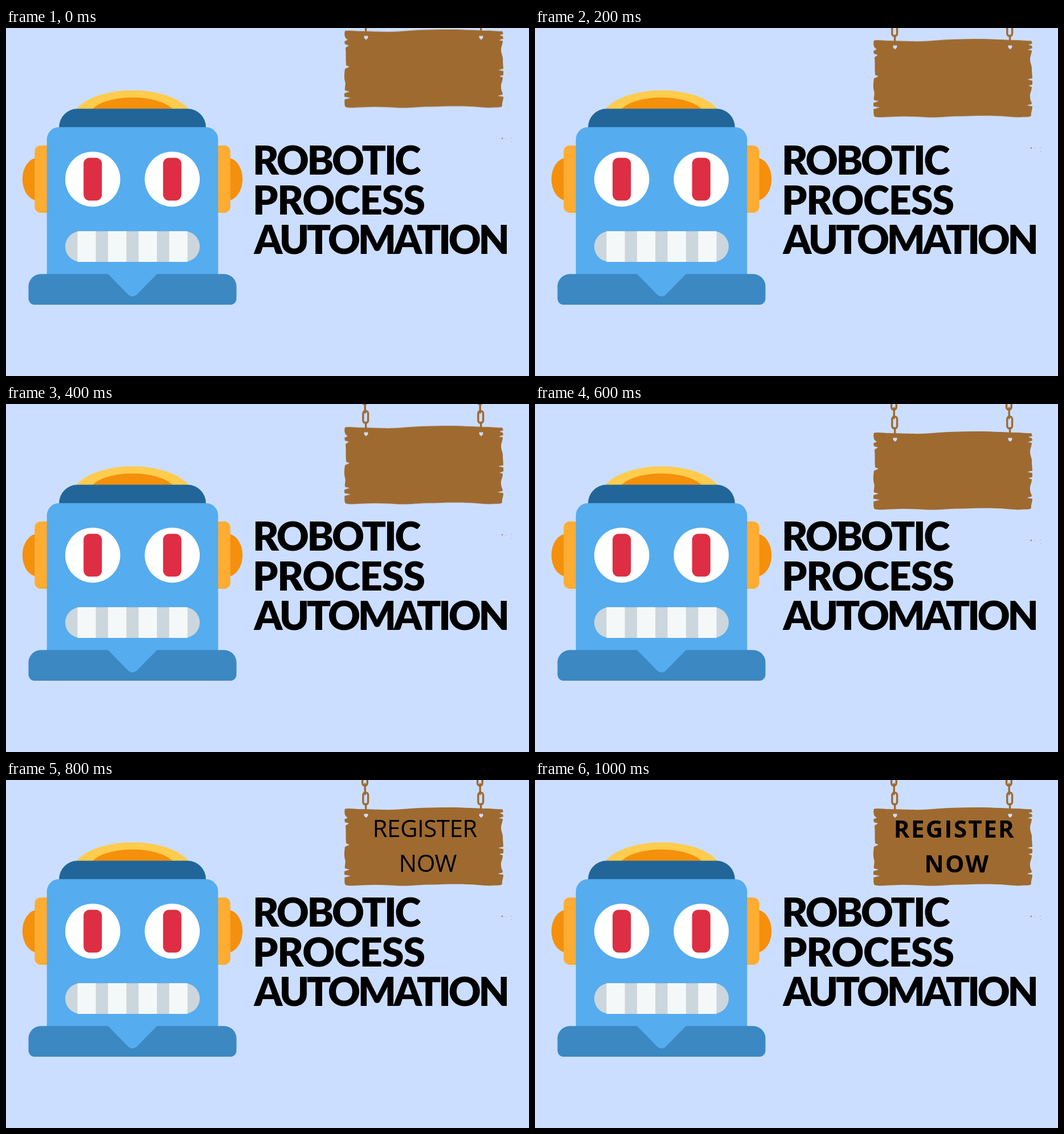
An HTML page for the animation above (1200 ms loop, 918 px wide and 610 px high).

```html
<!DOCTYPE html>
<html lang="en">
<head>
<meta charset="utf-8">
<title>Robotic Process Automation</title>
<style>
  html, body { margin: 0; width: 100%; height: 100%; overflow: hidden; background: #ccdeff; }
  svg { display: block; width: 100%; height: 100%; }
  .title { font: 900 70px Lato, sans-serif; }
  .call { font: 400 42px "Open Sans", sans-serif; text-anchor: middle; letter-spacing: -.5px; }
  .bold { font-weight: 700; letter-spacing: 2.4px; }
  .sign, .call { animation: 1.2s step-end infinite; }
  .sign { animation-name: drop; }
  .thin { animation-name: thin; }
  .bold { animation-name: bold; }
  @keyframes drop {
    0% { transform: translateY(-45.5px); }
    16.66% { transform: translateY(-28.8px); }
    33.33% { transform: translateY(-9.8px); }
    50%, 100% { transform: none; }
  }
  @keyframes thin {
    0% { opacity: 0; }
    66.66% { opacity: 1; }
    83.33%, 100% { opacity: 0; }
  }
  @keyframes bold {
    0% { opacity: 0; }
    83.33%, 100% { opacity: 1; }
  }
</style>
</head>
<body>
<svg viewBox="0 0 918 610" preserveAspectRatio="none">
  <defs>
    <g id="chain" fill="none" stroke="#9e6a30" stroke-width="3.4" stroke-linecap="round">
      <rect x="-5.4" y="-12" width="8.6" height="22" rx="4.3"/>
      <path d="M-.8 7V25M.6 42V52"/>
      <rect x="-4.2" y="22" width="8.8" height="21" rx="4.4"/>
    </g>
    <path id="hole" fill="#ccdeff" d="M0 66C-2 64.5-3.6 63-3.6 61.2C-3.6 58.6-.8 58.4 0 60.2C.8 58.4 3.6 58.6 3.6 61.2C3.6 63 2 64.5 0 66Z"/>
  </defs>

  <!-- robot on a 36-unit grid -->
  <g transform="translate(28.8 109.3) scale(10.735)">
    <g fill="#f4900c">
      <ellipse cx="2.5" cy="14.5" rx="2.5" ry="3.5"/>
      <ellipse cx="33.5" cy="14.5" rx="2.5" ry="3.5"/>
    </g>
    <g fill="#ffac33">
      <rect x="2" y="9" width="5" height="11" rx="1"/>
      <rect x="29" y="9" width="5" height="11" rx="1"/>
    </g>
    <ellipse cx="18" cy="5" rx="10" ry="5" fill="#ffcc4d"/>
    <ellipse cx="18" cy="4.1" rx="7" ry="2.93" fill="#f4900c"/>
    <path fill="#226699" d="M6 7V6A3 3 0 0 1 9 3H27A3 3 0 0 1 30 6V7Z"/>
    <path fill="#55acee" d="M4 31V8A2 2 0 0 1 6 6H30A2 2 0 0 1 32 8V31Z"/>
    <path fill="#3b88c3" d="M1 34V32A2 2 0 0 1 3 30H33A2 2 0 0 1 35 32V34A1 1 0 0 1 34 35H2A1 1 0 0 1 1 34Z"/>
    <path fill="#55acee" d="M13.9 29.9H22.1L18.707 33.35A1 1 0 0 1 17.293 33.35Z"/>
    <g fill="#fff">
      <circle cx="11.5" cy="14.5" r="4.5"/>
      <circle cx="24.5" cy="14.5" r="4.5"/>
    </g>
    <g fill="#dd2e44">
      <rect x="10" y="11" width="3" height="7" rx="1"/>
      <rect x="23" y="11" width="3" height="7" rx="1"/>
    </g>
    <rect x="7" y="23" width="22" height="5" rx="2.5" fill="#ccd6dd"/>
    <path fill="#f4f8f9" d="M9 23H12V28H9ZM14 23H17V28H14ZM19 23H22V28H19ZM24 23H27V28H24Z"/>
  </g>

  <g class="title">
    <text x="433" y="257" letter-spacing="-3.3">ROBOTIC</text>
    <text x="433" y="326.5" letter-spacing="-1.2">PROCESS</text>
    <text x="435.5" y="396" letter-spacing="-4.3">AUTOMATION</text>
  </g>

  <g class="sign">
    <use href="#chain" x="631"/>
    <use href="#chain" x="833"/>
    <path fill="#9e6a30" d="M595 50.5C603 49 612 51 624 51C650 51.5 668 53 690 51.5C715 49 748 48 778 48
      C806 48 828 50 846 50C856 50 865 52 871 51L873 56L866 58L872 60L873 64L865 67L872 68
      C872 74 869 77 869 84C869 91 873 95 872 103L873 117L864 119L873 121L873 128L866 130L872 132
      C872 139 868 143 869 150C869 156 872 158 872 162L863 164.5L873 166C873 173 870 177 871 182
      C869 186 862 184 853 185C838 186 825 183 810 183C790 182 770 183 745 183.5C725 183.5 709 186 690 185.5
      C666 184 646 183 626 184.5C614 184 606 187 596 184C593 180 595 175 594 171L605 168L594 166
      L594 160L603 157L595 155C594 149 597 145 595 139C593 132 594 124 595 117L603 113.5L597 111
      C596 100 597 90 596 80L602 76L595 74L594 69L600 66C595 64 593 58 595 50.5Z"/>
    <use href="#hole" x="632"/>
    <use href="#hole" x="834"/>
    <g fill="#8b8578">
      <circle cx="871" cy="239" r="1.3"/>
      <g opacity=".55">
        <circle cx="877.5" cy="239.5" r=".8"/>
        <circle cx="887" cy="238.5" r=".8"/>
        <circle cx="887.5" cy="245" r=".8"/>
        <circle cx="867" cy="239" r=".6"/>
        <circle cx="861" cy="239" r=".5"/>
      </g>
    </g>
  </g>

  <g class="call thin">
    <text x="735.2" y="100">REGISTER</text>
    <text x="740.3" y="161">NOW</text>
  </g>
  <g class="call bold">
    <text x="736.5" y="101">REGISTER</text>
    <text x="741" y="162">NOW</text>
  </g>
</svg>
</body>
</html>
```
